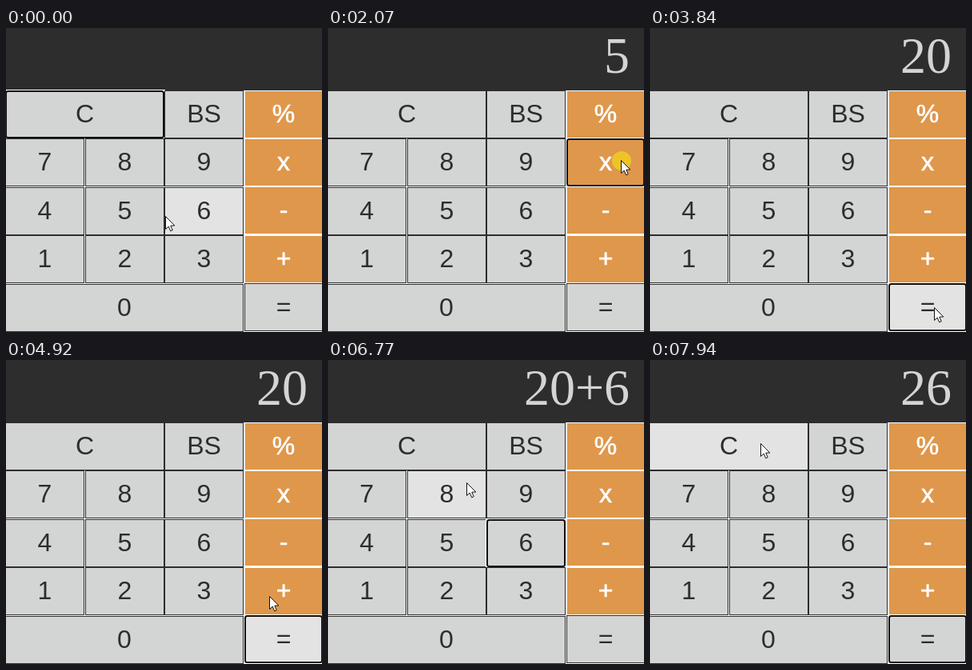
Animation, 395 px wide and 380 px high, one loop 8 s. Source, as an HTML page with a canvas:

```html
<!DOCTYPE html>
<html lang="en">
<head>
<meta charset="utf-8">
<title>Calculator</title>
<style>
  html, body { margin: 0; width: 100%; height: 100%; overflow: hidden; background: #fff; }
  canvas { display: block; width: 395px; height: 380px; }
</style>
</head>
<body>
<canvas id="stage" width="395" height="380"></canvas>
<script>
const ctx = document.getElementById('stage').getContext('2d');
const LOOP = 8000, STEP = 76.5;
const DARK = '#2d2d2d', GRAY = '#d3d5d4', HOVER = '#e3e3e3', ORANGE = '#df974b';

// Each word is one row; a repeated label spans several columns.
const grid = ['C C BS %', '7 8 9 x', '4 5 6 -', '1 2 3 +', '0 0 0 ='].map(row => row.split(' '));
const colX = i => Math.round(-1 + 99.67 * i);
const keys = grid.flatMap((row, r) => [...new Set(row)].map(label => {
  const first = row.indexOf(label), last = row.lastIndexOf(label);
  const side = first === 3;
  const top = 78 + 60.4 * r, x = colX(first);
  return {
    label, x,
    y: side ? Math.floor(top) : Math.round(top),
    w: Math.min(colX(last) + 99, 396) - x,
    h: 60,
    op: side && label !== '='
  };
}));

// Pointer moves: start time, number of steps, end point
const moves = [
  [0, 1, 200, 236],
  [1070, 2, 163, 230],
  [1610, 2, 371, 167],
  [1920, 1, 367, 166],
  [2380, 7, 91, 221],
  [3230, 2, 292, 299],
  [3530, 2, 356, 350],
  [4300, 6, 308, 330],
  [4760, 5, 332, 294],
  [6000, 4, 246, 240],
  [6690, 2, 174, 154],
  [6840, 7, 344, 339],
  [7860, 2, 139, 105]
];

// Presses: time down, time up, key
const presses = [
  [-1, -1, 'C'], [1230, 1380, '5'], [2000, 2150, 'x'], [2920, 3000, '4'],
  [3690, 3840, '='], [5620, 5770, '+'], [6310, 6460, '6'], [7380, 7540, '=']
];

function evaluate(text) {
  const [, a, op, b] = text.match(/^(\d+)([*+-])(\d+)$/);
  return String(op === '*' ? a * b : op === '+' ? +a + +b : a - b);
}

function enter(text, key) {
  if (key === 'C') return '';
  if (key === '=') return evaluate(text);
  return text + (key === 'x' ? '*' : key);
}

const easeOut = p => 1 - (1 - p) ** 3;

function pointerAt(t) {
  const i = moves.findLastIndex(m => m[0] <= t);
  const [start, steps, x, y] = moves[i];
  const [, , fromX, fromY] = moves[Math.max(i - 1, 0)];
  const step = Math.floor((t - start) / STEP) + 1;
  const p = easeOut(Math.min(step / steps, 1));
  return [fromX + (x - fromX) * p, fromY + (y - fromY) * p].map(Math.round);
}

function hoveredKey(t, x, y) {
  // The hover state lags behind until the next press.
  if (t >= 4300 && t < 5620) return '=';
  return keys.find(k => x >= k.x && x < k.x + k.w && y >= k.y && y < k.y + k.h)?.label;
}

function rect(x, y, w, h, color) {
  ctx.fillStyle = color;
  ctx.fillRect(x, y, w, h);
}

function paint(fill, stroke, width) {
  ctx.fillStyle = fill;
  ctx.fill();
  ctx.strokeStyle = stroke;
  ctx.lineWidth = width;
  ctx.stroke();
}

function drawKey({ label, x, y, w, h, op }, hovered, focused) {
  const face = op ? ORANGE : hovered ? HOVER : GRAY;
  if (focused) {
    rect(x - 1, y - 1, w + 2, h + 2, '#fff');
    ctx.beginPath();
    ctx.roundRect(x + 1, y + 1, w - 2, h - 2, 2.5);
    paint(face, '#101010', 2);
  } else {
    rect(x, y, w, h, op ? '#fff' : DARK);
    rect(x + 1, y + 1, w - 2, h - 2, face);
  }
  ctx.font = '32px "Liberation Sans", Arial, sans-serif';
  ctx.textAlign = 'center';
  ctx.fillStyle = op ? '#fff' : DARK;
  ctx.fillText(label, x + w / 2, y + 40);
  if (op) {
    ctx.strokeStyle = '#fff';
    ctx.lineWidth = 0.6;
    ctx.strokeText(label, x + w / 2, y + 40);
  }
}

function drawPointer(x, y, pressed) {
  if (pressed) {
    ctx.beginPath();
    ctx.arc(x, y, 12, 0, Math.PI * 2);
    ctx.fillStyle = '#edc428';
    ctx.fill();
  }
  ctx.save();
  ctx.translate(x - 0.5, y - 0.5);
  ctx.beginPath();
  [[0, 0], [0, 16], [3.7, 12.6], [6.2, 18.3], [8.7, 17.2], [6.3, 11.7], [11.3, 11.5]]
    .forEach(point => ctx.lineTo(...point));
  ctx.closePath();
  paint('#fff', '#111', 1);
  ctx.restore();
}

function draw(t) {
  const [x, y] = pointerAt(t);
  const [, up, focus] = presses.findLast(p => p[0] <= t);
  const text = presses.filter(p => p[1] <= t).reduce((s, p) => enter(s, p[2]), '');
  const hover = hoveredKey(t, x, y);

  rect(0, 0, 395, 380, '#fff');
  rect(0, 0, 395, 78, DARK);
  keys.forEach(k => drawKey(k, k.label === hover, k.label === focus));

  ctx.font = '64px "Liberation Serif", "Times New Roman", serif';
  ctx.textAlign = 'right';
  ctx.fillStyle = GRAY;
  ctx.fillText(text, 377, 56);
  drawPointer(x, y, t < up);
}

const start = performance.now();
function tick() {
  draw((performance.now() - start) % LOOP);
  requestAnimationFrame(tick);
}
tick();
</script>
</body>
</html>
```
